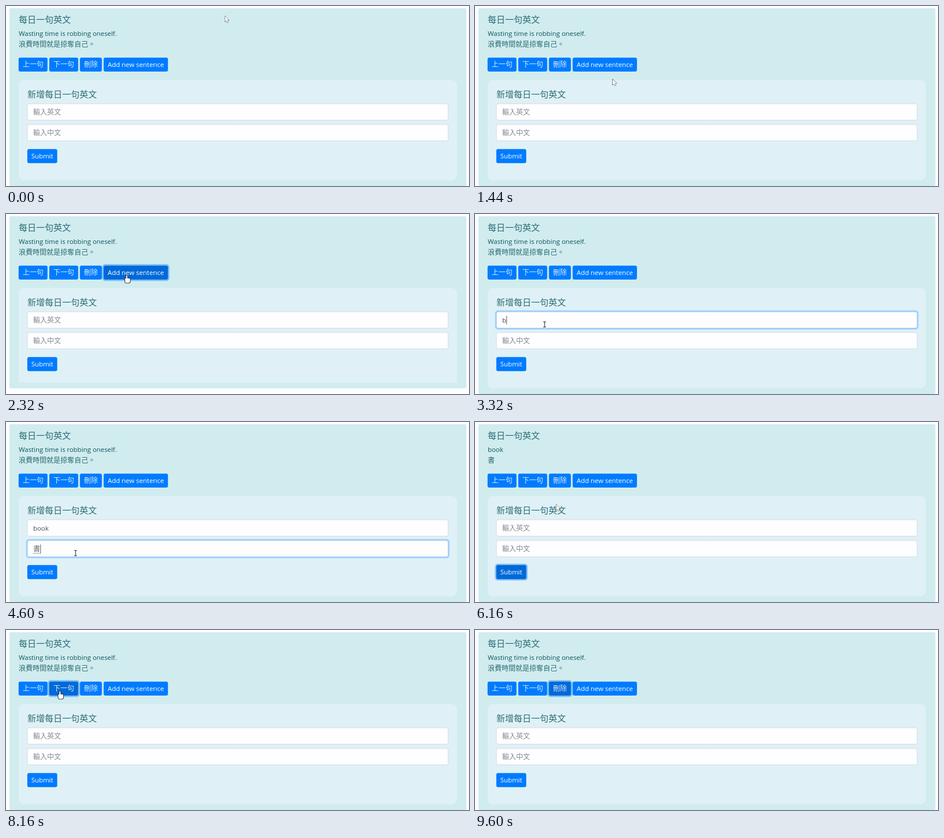
An HTML page with a canvas for the animation above (9.68 s loop, 800 by 313 pixels).

```html
<!DOCTYPE html>
<html lang="zh-Hant">
<head>
<meta charset="utf-8">
<title>每日一句英文</title>
<style>
html, body { margin: 0; width: 100%; height: 100%; overflow: hidden; background: #fefdff; }
canvas { display: block; }
</style>
</head>
<body>
<canvas id="stage" width="800" height="313"></canvas>
<script>
const ctx = document.getElementById('stage').getContext('2d');
const LOOP = 9680, STEP = 40, TRAVEL = 500, SLIDE = 420, POINTER_GONE = 9560;
const PANEL_TOP = 128.5, PANEL_HEIGHT = 174.5;
const INK = '#0c5460', MUTED = '#6c757d', DARK = '#1f2d45', INPUT = '#495057';
const PAGE = '#fefdff', BORDER = '#ced4da';

const WASTING = ['Wasting time is robbing oneself.', '浪費時間就是掠奪自己。'];
const SLOWLY = ['Do not be afraid of going slowly; only be afraid of standing still, for every small step in life will count.',
  '不怕慢,只怕站,人生的每一小步都算數。'];

const clamp = (v, lo, hi) => Math.max(lo, Math.min(hi, v));
const easeOut = p => 1 - (1 - clamp(p, 0, 1)) ** 3;
const smooth = p => p * p * (3 - 2 * p);

// Text: Latin and CJK runs each use their own font
const isCjk = s => /[\u3000-\uffef]/.test(s);
const runs = s => s.match(/[\u3000-\uffef]+|[^\u3000-\uffef]+/g) || [];
function setFont(run, size, weight) {
  ctx.font = isCjk(run)
    ? `300 ${size}px "Noto Sans CJK TC", "Noto Sans CJK", sans-serif`
    : `${weight} ${size * .95}px "Open Sans", "Noto Sans", sans-serif`;
}
function textWidth(s, size = 12, weight = 500) {
  return runs(s).reduce((sum, run) => {
    setFont(run, size, weight);
    return sum + ctx.measureText(run).width;
  }, 0);
}
function text(s, x, y, color = INK, size = 12, weight = 500) {
  ctx.fillStyle = color;
  for (const run of runs(s)) {
    setFont(run, size, weight);
    ctx.globalAlpha = isCjk(run) ? .85 : 1;
    ctx.fillText(run, x, y);
    x += ctx.measureText(run).width;
  }
  ctx.globalAlpha = 1;
  return x;
}

// Layout
const makeButton = (label, x, y) => ({ label, x, y, w: textWidth(label) + 14, h: 24.4 });
const makeField = (hint, y) => ({ hint, x: 37, y, w: 727, h: 28.5 });
const buttons = {};
let nextX = 21.7;
for (const [id, label] of [['prev', '上一句'], ['next', '下一句'], ['del', '刪除'], ['add', 'Add new sentence']]) {
  buttons[id] = makeButton(label, nextX, 89.7);
  nextX += buttons[id].w + 3;
}
buttons.submit = makeButton('Submit', 36.8, 248.8);
const fields = { en: makeField('輸入英文', 170), zh: makeField('輸入中文', 206) };
const controls = { ...buttons, ...fields };
const spots = {
  start: { x: 378, y: 17 }, wander: { x: 292, y: 165 }, below: { x: 186, y: 124 },
  heading: { x: 140, y: 143 }, leave: { x: 490, y: 140 }
};

// The pointer reaches each place at its time; arriving on a control clicks it
const script = [[0, 'start'], [600, 'wander'], [1640, 'add'], [1840, 'below'], [2060, 'add'],
  [2880, 'en'], [4160, 'zh'], [5480, 'submit'], [6160, 'heading'], [6560, 'prev'],
  [7000, 'prev'], [7680, 'next'], [8400, 'next'], [9040, 'del'], [9540, 'leave']];

const actions = {
  add(s, age) {
    s.sign = -s.sign;
    s.open += s.sign * easeOut(age / SLIDE);
  },
  en(s, age) { s.en = 'book'.slice(0, clamp(Math.floor((age - 200) / 160), 0, 4)); },
  zh(s, age) {
    s.zh = ['', 'ㄕ', 'ㄕㄨ', '書'][clamp(Math.floor(age / 130), 0, 3)];
    s.composing = age < 680;
  },
  submit(s) {
    s.index = s.list.push([s.en, s.zh]) - 1;
    s.en = s.zh = '';
  },
  prev(s) { s.index--; },
  next(s) { s.index++; },
  del(s) {
    s.list.splice(s.index, 1);
    s.index = Math.min(s.index, s.list.length - 1);
  }
};

function stateAt(t) {
  const s = { list: [SLOWLY, WASTING], index: 1, focus: '', en: '', zh: '', open: 1, sign: 1 };
  for (const [time, id] of script) {
    if (time > t || !actions[id]) continue;
    s.focus = id;
    actions[id](s, t - time);
  }
  return s;
}

function placeOf(id) {
  const c = controls[id];
  return c ? { x: c.x + Math.min(c.w * .35, 83), y: c.y + 16.5 } : spots[id];
}
function pointerAt(t) {
  const i = script.findIndex(([time]) => time > t);
  if (i < 0) return spots.leave;
  const [t0, from] = script[i - 1], [t1, to] = script[i];
  const span = Math.min(TRAVEL, t1 - t0);
  const k = smooth(clamp(1 - (t1 - t) / span, 0, 1));
  const a = placeOf(from), b = placeOf(to);
  return { x: a.x + (b.x - a.x) * k, y: a.y + (b.y - a.y) * k };
}
const inside = (b, p) => p.x >= b.x && p.x <= b.x + b.w && p.y >= b.y && p.y <= b.y + b.h;

// Drawing
function box(x, y, w, h, r, fill, stroke) {
  ctx.beginPath();
  ctx.roundRect(x, y, w, h, r);
  ctx.fillStyle = fill;
  ctx.fill();
  if (stroke) {
    ctx.strokeStyle = stroke;
    ctx.lineWidth = .8;
    ctx.stroke();
  }
}
const ring = (b, color) => box(b.x - 2.4, b.y - 2.4, b.w + 4.8, b.h + 4.8, 5, color);

function button(b, focused, hovered) {
  if (focused) ring(b, 'rgba(38,143,255,.5)');
  box(b.x, b.y, b.w, b.h, 3, focused || hovered ? '#0069d9' : '#007bff');
  text(b.label, b.x + 7, b.y + 16.6, '#fff');
}

function field(b, value, focused, composing) {
  if (focused) ring(b, 'rgba(0,123,255,.25)');
  box(b.x, b.y, b.w, b.h, 3, PAGE, focused ? '#80bdff' : BORDER);
  const x = b.x + 10, base = b.y + 19;
  const end = text(value || b.hint, x, base, value ? INPUT : MUTED);
  if (!focused) return;
  ctx.fillStyle = INPUT;
  ctx.fillRect(value ? end + .3 : x, b.y + 7, .9, 15);
  if (composing && value) {
    for (let dx = x; dx < end; dx += 2) ctx.fillRect(dx, b.y + 22, 1, 1);
  }
}

function strokeLines(...lines) {
  ctx.beginPath();
  for (const [x0, y0, x1, y1] of lines) {
    ctx.moveTo(x0, y0);
    ctx.lineTo(x1, y1);
  }
  ctx.stroke();
}

function scoreCard(top) {
  ctx.save();
  ctx.translate(0, top);
  button(makeButton('Edit', 5.8, 11.8));
  box(6, 39, 789, 103.5, 9, '#d9e6fc');
  box(21.7, 53.8, 32.6, 19.4, 9.7, '#22a7b3');
  text('1', 35, 67, '#fff', 10, 700);
  text('L1~L9 Worksheets, Assignment & Tests on Orvane Studyroom', 62, 67.7, DARK);
  text('( 上課講義、作業、測驗、每一課各占3%，九課共27%)', 395, 67.7, DARK);
  ctx.strokeStyle = '#77808e';
  ctx.lineWidth = .8;
  strokeLines([772, 90, 778, 84], [775.5, 90, 778, 87.5]);
  box(33.5, 98.5, 355, 28.5, 3, PAGE, BORDER);
  text('Enter the score', 43, 117, MUTED);
  text('占分比例 :', 412.5, 117.3, DARK);
  text('百分比成績換算 :', 601, 117.3, DARK);
  for (const x of [473.5, 698.5]) box(x, 98.5, 49.5, 28.5, 3, '#e6eaf0', BORDER);
  text('27', 482.5, 117, INPUT);
  ctx.restore();
}

function drawPointer({ x, y }, kind) {
  ctx.save();
  ctx.translate(x, y);
  ctx.lineJoin = 'round';
  ctx.strokeStyle = '#222';
  ctx.fillStyle = '#fff';
  ctx.lineWidth = 1;
  if (kind === 'text') {
    strokeLines([-2, 1, 2.5, 1], [.3, 1, .3, 10], [-2, 10, 2.5, 10]);
  } else {
    ctx.beginPath();
    if (kind === 'hand') {
      ctx.lineWidth = 1.8;
      ctx.roundRect(0, .4, 2, 9, 1);
      ctx.roundRect(-1.8, 5.5, 8.6, 8, [1, 2, 3, 2]);
    } else {
      const arrow = [[.4, .3], [.4, 10.4], [2.7, 8.3], [4.3, 12], [6, 11.3], [4.4, 7.6], [7.5, 7.5]];
      arrow.forEach(p => ctx.lineTo(...p));
      ctx.closePath();
    }
    ctx.stroke();
    ctx.fill();
  }
  ctx.restore();
}

function draw(t) {
  const s = stateAt(t), pointer = pointerAt(t), visible = t < POINTER_GONE;
  const height = PANEL_HEIGHT * s.open, bottom = PANEL_TOP + height + 10;
  const reachable = b => b.y < PANEL_TOP || s.open > .99;
  const hovered = b => visible && reachable(b) && inside(b, pointer);
  const show = id => button(buttons[id], s.focus === id, hovered(buttons[id]));

  ctx.fillStyle = PAGE;
  ctx.fillRect(0, 0, 800, 313);
  box(6, 3.7, 789.5, bottom - 3.7, 3, '#d1ecee');
  text('每日一句英文', 22, 28.5, INK, 15);
  const [english, chinese] = s.list[s.index];
  text(english, 22, 52.2);
  text(chinese, 22, 70.8);
  ['prev', 'next', 'del', 'add'].forEach(show);

  ctx.save();
  ctx.beginPath();
  ctx.rect(0, PANEL_TOP, 800, height);
  ctx.clip();
  box(22, PANEL_TOP, 757, PANEL_HEIGHT, 9, '#dff1f6');
  text('新增每日一句英文', 37, 158.8, INK, 15);
  for (const id in fields) field(fields[id], s[id], s.focus === id, id === 'zh' && s.composing);
  show('submit');
  ctx.restore();

  if (bottom < 301) scoreCard(bottom);
  if (visible) {
    const kind = Object.values(buttons).some(hovered) ? 'hand'
      : Object.values(fields).some(hovered) ? 'text' : 'arrow';
    drawPointer(pointer, kind);
  }
}

const begun = performance.now();
function tick() {
  const t = (performance.now() - begun) % LOOP;
  draw(Math.min(Math.floor(t / STEP) * STEP, LOOP - 2 * STEP));
  requestAnimationFrame(tick);
}
tick();
</script>
</body>
</html>
```
